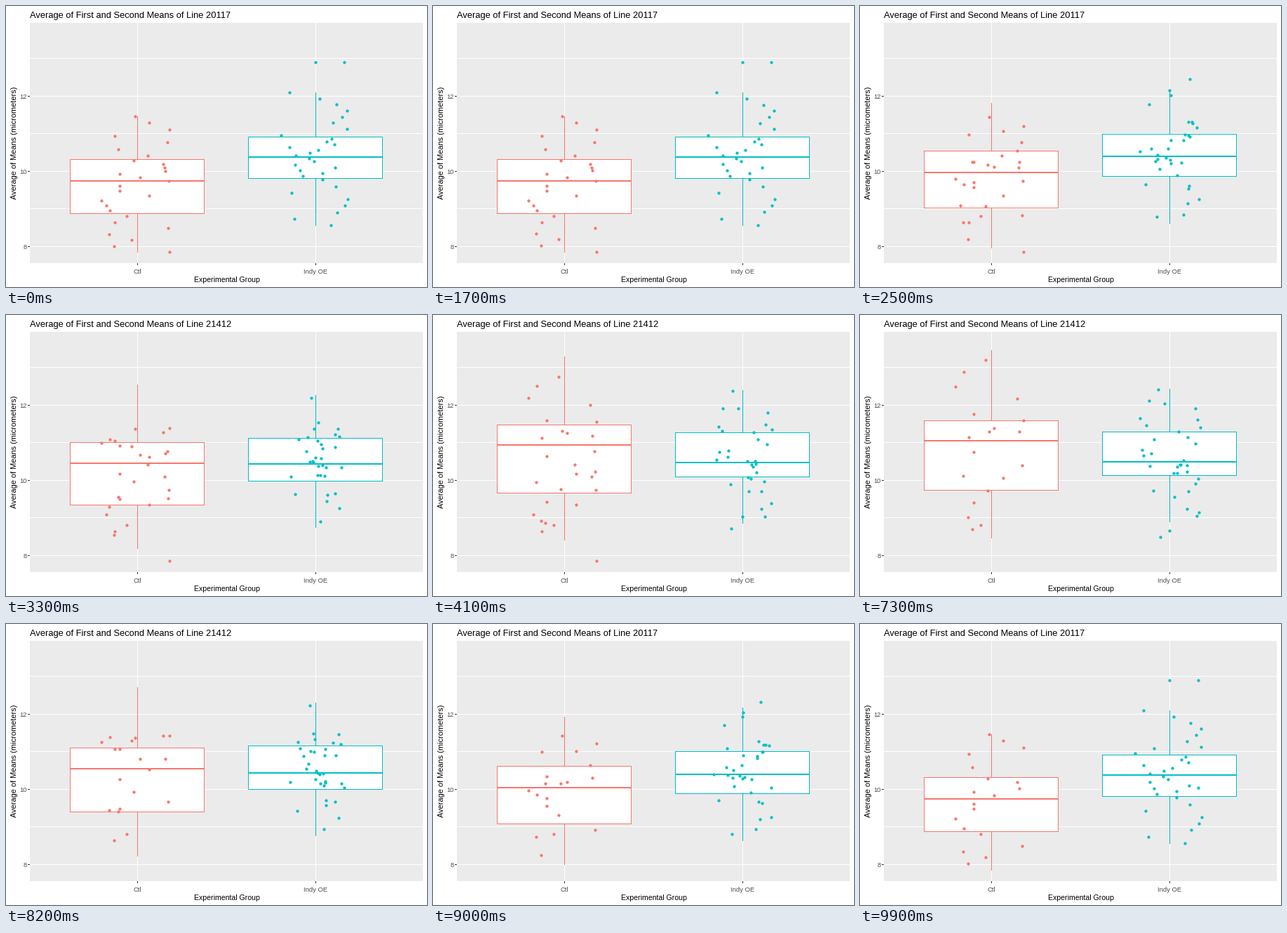
Animation of 600x400 px, one loop 10000 ms. Source, as a matplotlib script:

```python
import numpy as np
import matplotlib.pyplot as plt
from matplotlib.animation import FuncAnimation
from matplotlib.patches import Rectangle

plt.rcParams["font.family"] = "Liberation Sans"

W, H, FRAMES = 600, 400, 100
LEAVE, ARRIVE, RETURN = 16, 50, 67      # end of hold, second state, end of its hold
LEFT, TOP, WIDE, TALL = 34, 24, 560, 342
HALF, SPREAD = 96, 51                   # half box width, widest jitter
TITLE = "Average of First and Second Means of Line {}"
LINES = (20117, 21412)

# Per state: dot count, then minimum, quartiles and maximum, then any outlier
CTL = [(27, (7.85, 8.88, 9.74, 10.32, 11.46), None),
       (19, (8.52, 9.81, 11.16, 11.70, 13.64), None)]
INDY = [(31, (8.56, 9.81, 10.37, 10.92, 12.09), 12.90),
        (33, (8.92, 10.15, 10.49, 11.33, 12.45), 8.28)]

rng = np.random.default_rng(12)
jitter = rng.uniform(-SPREAD, SPREAD, 60)


def y_px(value):
    return 770 - 53.5 * np.asarray(value)


def scatter(centre, start, count, summary, outlier):
    """Dots spread evenly over the quartiles, in random order."""
    n = count - (outlier is not None)
    values = np.interp(np.linspace(0, 1, n), np.linspace(0, 1, 5), summary)
    offsets = jitter[start:start + count]
    if outlier is not None:
        values = np.append(values, outlier)
    rng.shuffle(values)
    if outlier is not None:             # the box plot marks it on its axis too
        values = np.insert(values, 0, outlier)
        offsets = np.insert(offsets, 0, 0)
    return np.column_stack([centre + offsets, y_px(values)])


def ease(p):
    return (1 - np.cos(np.pi * p)) / 2


def progress(i):
    if i <= LEAVE:
        return 0.0
    if i < ARRIVE:
        return (i - LEAVE) / (ARRIVE - LEAVE)
    if i <= RETURN:
        return 1.0
    return (FRAMES - i) / (FRAMES - RETURN)


def blend(a, b, t):
    return a + (b - a) * t


fig = plt.figure(figsize=(W / 72, H / 72), dpi=72, facecolor="white")
ax = fig.add_axes([0, 0, 1, 1])
ax.set_xlim(0, W)
ax.set_ylim(H, 0)
ax.axis("off")


def line(x, y, color, width=1, z=1):
    return ax.plot(x, y, color=color, lw=width, zorder=z, antialiased=False,
                   solid_capstyle="butt")[0]


def label(x, y, s, size, color="black", **kw):
    return ax.text(x, y, s, fontsize=size, color=color, **kw)


class Group:
    def __init__(self, centre, color, states, starts):
        self.box = [y_px(summary) for _, summary, _ in states]
        self.dots = [scatter(centre, s, *state) for s, state in zip(starts, states)]
        left, right = centre - HALF, centre + HALF - 1
        self.whiskers = [line([centre, centre], [0, 0], color, z=2) for _ in range(2)]
        self.rect = ax.add_patch(Rectangle((left, 0), right - left, 1, fc="white", ec=color,
                                           lw=1, zorder=3, antialiased=False))
        self.median = line([left, right], [0, 0], color, 2, 4)
        self.marks = ax.plot([], [], "o", color=color, ms=4.3, mew=0, zorder=5,
                             antialiased=False)[0]

    def update(self, t, leaving):
        low, q1, med, q3, top = np.round(blend(*self.box, t))
        self.whiskers[0].set_ydata([top, q3])
        self.whiskers[1].set_ydata([q1, low])
        self.rect.set_y(q3)
        self.rect.set_height(q1 - q3)
        self.median.set_ydata([med, med])
        a, b = self.dots
        n = min(len(a), len(b))
        # Unmatched dots stay put until the next state is reached
        spare = (a if leaving else b)[n:]
        xy = np.vstack([blend(a[:n], b[:n], t), spare])
        self.marks.set_data(xy[:, 0], xy[:, 1])


ax.add_patch(Rectangle((LEFT, TOP), WIDE, TALL, fc="#EBEBEB", ec="none", zorder=0))
for value in range(8, 14):
    y = int(y_px(value))
    line([LEFT - 1, LEFT + WIDE - 1], [y, y], "white")
    if value % 2 == 0:
        line([LEFT - 3, LEFT - 1], [y, y], "#333333")
        label(29.8, y + 3.7, str(value), 9.4, "#4D4D4D", ha="right")
for x, name in ((187, "Ctl"), (441, "Indy OE")):
    line([x, x], [TOP - 1, TOP + TALL - 1], "white")
    line([x, x], [TOP + TALL, TOP + TALL + 2], "#333333")
    label(x, 380.8, name, 9.4, "#4D4D4D", ha="center")
label(314.5, 393, "Experimental Group", 10.5, ha="center")
label(17, 195, "Average of Means (micrometers)", 11, ha="right", va="center", rotation=90)
title = label(LEFT, 17.3, "", 12.83)

# Jitter is dealt out to Ctl first, then Indy OE
groups = [Group(187, "#F8766D", CTL, (0, 0)),
          Group(441, "#00BFC4", INDY, [count for count, *_ in CTL])]


def draw(i):
    p = progress(i)
    title.set_text(TITLE.format(LINES[int(p >= 0.5)]))
    for g in groups:
        g.update(ease(p), i < ARRIVE)
    return []


anim = FuncAnimation(fig, draw, frames=FRAMES, interval=100, repeat=True,
                     repeat_delay=0, blit=False)
plt.show()
```
